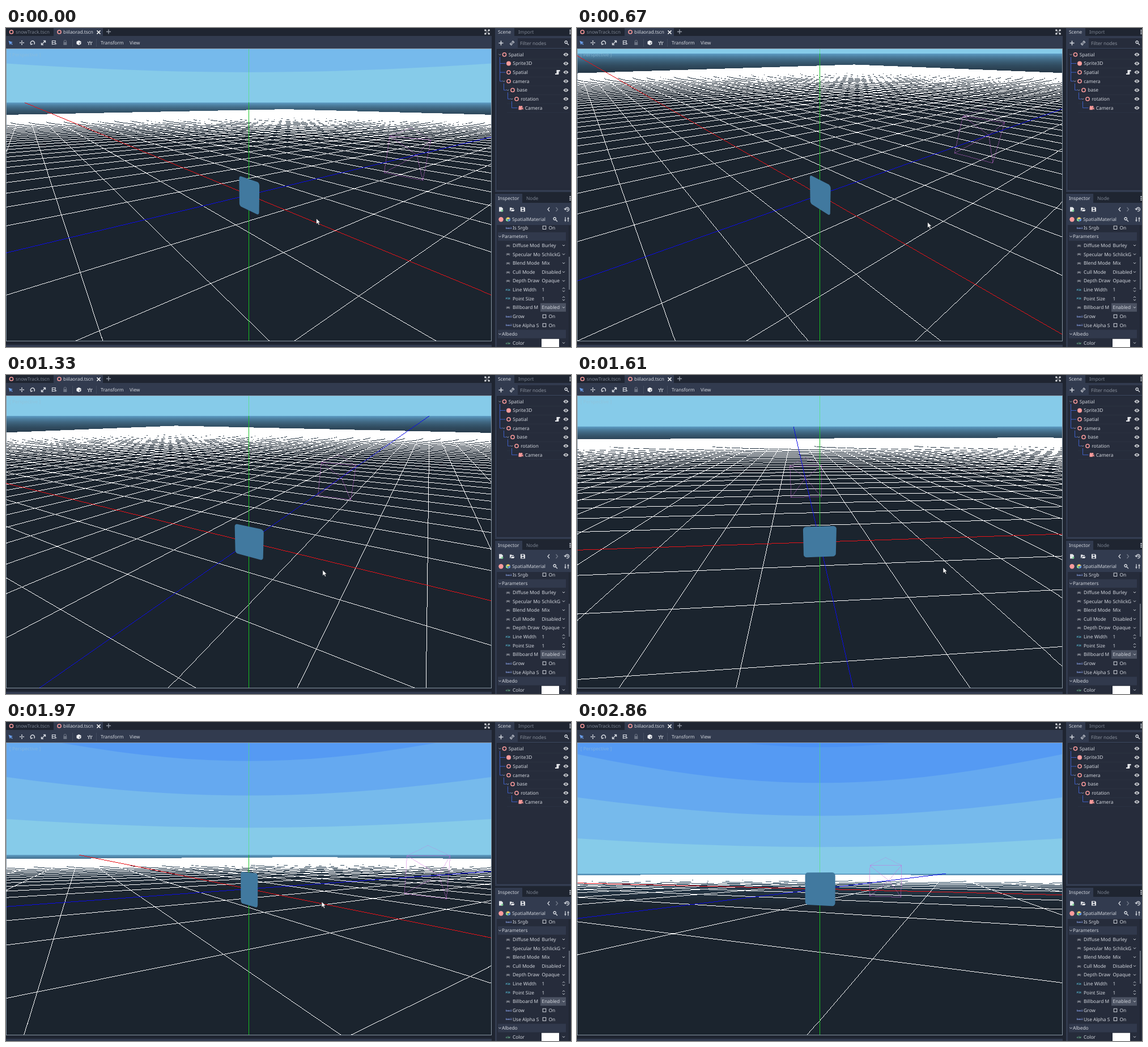
An HTML page with a canvas that plays this animation: 997 px wide and 562 px high, repeating every 3.55 s.

```html
<!DOCTYPE html>
<html lang="en">
<head>
<meta charset="utf-8">
<title>Billboard orbit</title>
<style>
html, body { margin: 0; width: 100%; height: 100%; overflow: hidden; background: #1f2531; }
canvas, svg { position: absolute; left: 0; top: 0; width: 997px; height: 562px; display: block; }
text { font: 8.4px "Noto Sans", "Open Sans", sans-serif; text-rendering: geometricPrecision; white-space: pre; }
.tag { font: bold 4.4px "Noto Sans Mono", monospace; }
</style>
</head>
<body>
<canvas id="view" width="997" height="562"></canvas>
<svg id="ui" viewBox="0 0 997 562"></svg>
<script>
const LOOP = 3550, RAD = Math.PI / 180;
const F = 493.7, CX = 428.5, CY = 294.2, DIST = 5.44;
const VIEW = { x: 1, y: 37, w: 855, h: 514 };

// first change, last change, number of changes
const BURSTS = [[80, 590, 8], [670, 1170, 8], [1250, 1750, 8], [1830, 2280, 7], [2360, 2860, 8]];

// time, pitch, yaw, pointer x, pointer y
const KEYS = [
  [0, 18.26, -37.27, 547.5, 335.5],
  [371, 27.68, -14.06, 495, 349],
  [670, 26.78, -38.15, 618.5, 342],
  [1027, 24.1, -15.92, 476, 344.5],
  [1607, 22.4, -94.96, 646, 339],
  [1980, 6.94, -31.04, 557, 316.5],
  [2560, 3.3, -64, 660, 312],
  [2789, 3.13, -65.8, 970, 550],
  [2860, 3.13, -65.8, 975, 570]
];

function snap(t) {
  let s = 0;
  for (const [a, b, n] of BURSTS) {
    if (t < a) break;
    const step = (b - a) / (n - 1);
    s = a + step * Math.min(n - 1, Math.floor((t - a + 11) / step));
  }
  return s;
}

function slope(i, c) {
  if (i === 0 || i >= KEYS.length - 3) return 0;
  const a = KEYS[i - 1], b = KEYS[i + 1];
  return (b[c] - a[c]) / (b[0] - a[0]);
}

function pose(t) {
  let i = 0;
  while (i < KEYS.length - 2 && t >= KEYS[i + 1][0]) i++;
  const a = KEYS[i], b = KEYS[i + 1], span = b[0] - a[0];
  const s = Math.min(1, (t - a[0]) / span), q = 1 - s;
  return [1, 2, 3, 4].map(c =>
    q * q * (1 + 2 * s) * a[c] + s * s * (3 - 2 * s) * b[c] +
    s * q * span * (q * slope(i, c) - s * slope(i + 1, c)));
}

// ---- 3D view ----
const g = document.getElementById('view').getContext('2d', { willReadFrequently: true });
const SKY = ['#4c92f4', '#559af3', '#65a9f0', '#76baec', '#86cbe9'];
const EDGES = [23.7, 17.6, 11.5, 5.4];
let cp, sp, ca, sa, image;

function aim(pitch, yaw) {
  cp = Math.cos(pitch * RAD); sp = Math.sin(pitch * RAD);
  ca = Math.cos(yaw * RAD); sa = Math.sin(yaw * RAD);
}
const toEye = ([x, y, z]) => {
  const fwd = x * ca - z * sa;
  return [x * sa + z * ca, y * cp + fwd * sp, DIST + fwd * cp - y * sp];
};
const toScreen = ([r, u, d]) => [CX + F * r / d, CY - F * u / d];
const project = p => toScreen(toEye(p));

// hard one-pixel line, cut to the near plane and to the viewport
function drawLine(p, q, color, alpha = 1) {
  const near = 0.1;
  let a = toEye(p), b = toEye(q);
  if (a[2] < near && b[2] < near) return;
  const cut = (i, o) => i.map((v, n) => v + (o[n] - v) * (near - i[2]) / (o[2] - i[2]));
  if (a[2] < near) a = cut(a, b);
  if (b[2] < near) b = cut(b, a);
  const [x0, y0] = toScreen(a), [x1, y1] = toScreen(b), dx = x1 - x0, dy = y1 - y0;
  let from = 0, to = 1;
  const limit = (v, d, lo, size) => {
    const m = (lo - v) / d, n = (lo + size - 0.01 - v) / d;
    from = Math.max(from, Math.min(m, n));
    to = Math.min(to, Math.max(m, n));
  };
  limit(x0, dx || 1e-9, VIEW.x, VIEW.w);
  limit(y0, dy || 1e-9, VIEW.y, VIEW.h);
  if (from >= to) return;
  const steps = Math.ceil(Math.max(Math.abs(dx), Math.abs(dy)) * (to - from));
  for (let i = 0; i <= steps; i++) {
    const t = from + (to - from) * i / steps;
    const at = (Math.floor(y0 + dy * t) * image.width + Math.floor(x0 + dx * t)) * 4;
    for (let c = 0; c < 3; c++) image.data[at + c] += (color[c] - image.data[at + c]) * alpha;
  }
}

function drawSky(pitch) {
  const bottom = VIEW.y + VIEW.h;
  g.fillStyle = SKY[0];
  g.fillRect(VIEW.x, VIEW.y, VIEW.w, VIEW.h);
  EDGES.forEach((e, i) => {
    const ce = Math.cos(e * RAD), se = Math.sin(e * RAD);
    g.fillStyle = SKY[i + 1];
    g.beginPath();
    g.moveTo(-400, bottom);
    for (let b = -60; b <= 60; b += 4) {
      const r = ce * Math.sin(b * RAD), f = ce * Math.cos(b * RAD);
      g.lineTo(...toScreen([r, se * cp + f * sp, f * cp - se * sp]));
    }
    g.lineTo(1400, bottom);
    g.fill();
  });
  const yAt = drop => CY - F * Math.tan((pitch - drop) * RAD);
  const top = yAt(0), low = yAt(7);
  const grad = g.createLinearGradient(0, top, 0, low);
  for (const d of [0, 0.5, 1, 1.5, 2, 3, 5, 7]) {
    const k = d === 7 ? 1 : 1 - Math.pow(1 - d / 90, 50);
    const mix = (a, b) => Math.round(a + (b - a) * k);
    grad.addColorStop(Math.min(1, (yAt(d) - top) / (low - top)),
      `rgb(${mix(93, 27)},${mix(156, 36)},${mix(196, 46)})`);
  }
  g.fillStyle = grad;
  g.fillRect(VIEW.x, top, VIEW.w, bottom - top);
  return top;
}

function drawGrid() {
  const N = 50, white = [255, 255, 255];
  for (let i = -N; i <= N; i++) {
    if (i === 0) continue;
    drawLine([i, 0, -N], [i, 0, N], white);
    drawLine([-N, 0, i], [N, 0, i], white);
  }
}

function drawGizmo() {
  const w = 0.63, z = 6.45, eye = [0, 0, 7.25], tip = [0, w * 1.5, z];
  const pink = [205, 105, 220];
  const c = [[-w, -w, z], [w, -w, z], [w, w, z], [-w, w, z]];
  c.forEach((p, i) => {
    drawLine(p, c[(i + 1) % 4], pink, 0.5);
    drawLine(p, eye, pink, 0.5);
  });
  drawLine(c[2], tip, pink, 0.3);
  drawLine(c[3], tip, pink, 0.3);
}

function drawSprite() {
  const h = 0.32, r = 0.06;
  g.fillStyle = '#41799f';
  g.beginPath();
  for (let i = 0; i < 4; i++) {
    const sx = i === 0 || i === 3 ? 1 : -1, sy = i < 2 ? 1 : -1;
    for (let k = 0; k <= 4; k++) {
      const n = (i * 90 + k * 22.5) * RAD;
      g.lineTo(...project([sx * (h - r) + r * Math.cos(n), sy * (h - r) + r * Math.sin(n), 0]));
    }
  }
  g.fill();
}

function drawView(pitch, yaw) {
  const far = 4000;
  aim(pitch, yaw);
  g.clearRect(0, 0, 997, 562);
  g.save();
  g.beginPath();
  g.rect(VIEW.x, VIEW.y, VIEW.w, VIEW.h);
  g.clip();
  const horizon = Math.max(VIEW.y, Math.round(drawSky(pitch)));
  image = g.getImageData(0, 0, 997, 562);
  drawGrid();
  drawGizmo();
  drawLine([-far, 0, 0], [far, 0, 0], [232, 18, 24]);
  drawLine([0, 0, -far], [0, 0, far], [12, 12, 230]);
  g.putImageData(image, 0, 0);
  g.fillStyle = 'rgba(70,235,90,.6)';
  g.fillRect(428, VIEW.y, 1, horizon - VIEW.y);
  g.fillStyle = 'rgb(22,195,34)';
  g.fillRect(428, horizon, 1, 600);
  drawSprite();
  g.restore();
}

// ---- editor panels ----
const FG = '#d3d7de', DIM = '#7b8391', PINK = '#fc9c9c';
const PANEL = '#323b4f', INSET = '#262c3b', DARK = '#1f2531';
const out = [];
const text = (x, y, s, c = FG, cls = '') =>
  out.push(`<text x="${x}" y="${y + 3}" fill="${c}" class="${cls}">${s}</text>`);
const rect = (x, y, w, h, c, extra = '') =>
  out.push(`<rect x="${x}" y="${y}" width="${w}" height="${h}" fill="${c}" ${extra}/>`);
const line = (x, y, d, c = FG, w = 1.2) =>
  out.push(`<path transform="translate(${x} ${y})" d="${d}" fill="none" stroke="${c}" stroke-width="${w}"/>`);
const shape = (x, y, d, c = FG) =>
  out.push(`<path transform="translate(${x} ${y})" d="${d}" fill="${c}" fill-rule="evenodd"/>`);
const ring = (x, y) =>
  out.push(`<circle cx="${x}" cy="${y}" r="3.1" fill="none" stroke="${PINK}" stroke-width="1.5"/>`);
const dot = (x, y, r, c) => out.push(`<circle cx="${x}" cy="${y}" r="${r}" fill="${c}"/>`);
const chevron = (x, y, c = FG) => line(x, y, 'M-2-1L0 1L2-1', c, 1);
const search = (x, y) => line(x, y, 'M-3-1A2.2 2.2 0 1 0 1.4-1A2.2 2.2 0 1 0-3-1M.8 .8L4 4', FG, 1.4);
const eye = (x, y) => {
  shape(x, y, 'M-4.5 0Q0-6 4.5 0Q0 6-4.5 0Z', '#e4e6ea');
  dot(x, y, 1.9, DARK);
  dot(x, y, 0.9, '#e4e6ea');
};
const more = (x, y) => [-3, 0, 3].forEach(k => rect(x - 1, y + k - 1, 2, 2, FG));

function mainBar() {
  rect(0, 0, 997, 36, DARK);
  rect(0, 14, 857, 22, PANEL);
  rect(84, 0, 87, 14, PANEL);
  ring(9.5, 7); text(17, 7, 'snowTrack.tscn', DIM);
  ring(94, 7); text(101, 7, 'biilaorad.tscn');
  line(163.5, 7.5, 'M-3-3L3 3M3-3L-3 3', '#fff', 1.6);
  line(181, 6.5, 'M-4 0H4M0-4V4', '#9299a5', 1.4);
  line(849, 7, 'M-4-1.5V-4H-1.5M1.5-4H4V-1.5M4 1.5V4H1.5M-1.5 4H-4V1.5M-4-4L-1-1M4-4L1-1M4 4L1 1M-4 4L-1 1', '#e4e6ea', 1.2);
  shape(8, 26, 'M-3.5-3.5L4-1L1.3 .2L3.8 2.8L2.7 3.8L.2 1.3L-1 4Z', '#699ce8');
  line(28, 26, 'M-4 0H-1.5M1.5 0H4M0-4V-1.5M0 1.5V4', FG, 1.6);
  dot(28, 26, 1, FG);
  line(47, 26, 'M-3 2.5A3.5 3.5 0 1 1 2.5 2.8M-4 0L-3 3L0 2', FG, 1.4);
  line(66, 26, 'M-3.5 0V3.5H0M0-3.5H3.5V0M-3 3L3-3', FG, 1.4);
  line(85, 26, 'M-4-3.5H3M-4-.5H1M-4 2.5H1M-3.5-4V3.5M2-3V1', FG, 1.2);
  shape(87.5, 28, 'M-1.5-2L2.5 0L0 .6L-.5 2.5Z');
  rect(101.3, 25, 6, 5, '#6a7282'); line(104.3, 25, 'M-2 0V-1.5A2 2 0 0 1 2-1.5V0', '#6a7282', 1.2);
  shape(128.5, 26, 'M0-4.3L4-2.2V2.2L0 4.3L-4 2.2V-2.2ZM.6 .5V3L3-1Z', '#eceef1');
  line(148, 27, 'M-2 3V0A2 2 0 0 1 2 0V3M-3.5-3V-1M0-4V-2.4M3.5-3V-1', FG, 1.2);
  rect(117, 19, 1, 14, '#434c5f'); rect(159, 19, 1, 14, '#434c5f');
  text(167, 26, 'Transform'); text(218, 26, 'View');
}

function frame() {
  rect(0.5, 36.5, 856, 515, 'none', 'stroke="#8795a2" stroke-width="1"');
  rect(857, 36, 140, 526, DARK);
  rect(0, 552, 863, 10, DARK);
  rect(0, 558, 857, 4, PANEL);
  text(6, 46.5, '[ Perspective ]', 'rgba(150,190,212,.6)');
}

function sceneDock() {
  rect(863, 14, 134, 275, PANEL);
  rect(863, 0, 34, 14, PANEL);
  text(868, 7, 'Scene'); text(904, 7, 'Import', DIM); more(995.5, 7);
  line(873.5, 26.5, 'M-4 0H4M0-4V4', FG, 1.6);
  line(893, 26.5, 'M-1 1L1-1M-.5-2L1.5-3.5L3.5-1.5L2 .5M.5 2L-1.5 3.5L-3.5 1.5L-2-.5', FG, 1.2);
  rect(903, 18, 94, 17, INSET); text(907, 26.5, 'Filter nodes', '#8b929e'); search(989, 26);
  rect(866.5, 37.5, 131, 247, INSET, `stroke="${DARK}"`);
  const rowY = i => 46.8 + 15.65 * i;
  for (let i = 1; i < 8; i++) rect(884, rowY(i) - 8, 110, 1, '#2c3342');
  const BLUE = '#3f5fc4';
  line(871.5, 0, `M0 51V${rowY(3)}H5M0 ${rowY(1)}H10M0 ${rowY(2)}H10`, BLUE, 1);
  [[878.5, 3], [885.5, 4], [892.5, 5]].forEach(([x, i]) =>
    line(x, 0, `M0 ${rowY(i) + 4}V${rowY(i + 1)}H${i === 5 ? 10 : 5}`, BLUE, 1));
  [[871.5, 0], [878.5, 3], [885.5, 4], [892.5, 5]].forEach(([x, i]) => chevron(x, rowY(i), '#9aa1ad'));
  const nodes = [['Spatial', 879.5], ['Sprite3D', 887], ['Spatial', 887], ['camera', 887],
    ['base', 894], ['rotation', 901], ['Camera', 908.5]];
  nodes.forEach(([name, x], i) => {
    const y = rowY(i);
    if (i === 1) dot(x, y, 4, PINK);
    else if (i === 6) {
      rect(x - 4, y - 1, 5.5, 4.5, PINK); dot(x - 2, y - 2, 1.8, PINK); dot(x + 1.2, y - 2, 1.8, PINK);
      shape(x + 1, y + 1, 'M0 0L3-2V2.5Z', PINK);
    } else ring(x, y);
    text(x + 7.3, y, name);
    eye(988, y);
  });
  shape(973, rowY(2), 'M-1.5-4H4.5V-1.5H2.5V2.5Q2.5 4 1 4H-4V1.8H-1.5Z', '#e4e6ea');
}

const TYPES = { bool: ['bool', '#8da6f0'], enum: ['(E)', '#e4e6ea'], flt: ['Flt', '#61daf4'], clr: ['clr', '#7fe0a0'] };

function inspector() {
  rect(863, 308, 134, 254, PANEL);
  rect(863, 292, 48, 16, PANEL);
  text(868, 300, 'Inspector'); text(918, 300, 'Node', DIM); more(995.5, 300);
  shape(873.5, 319.5, 'M-3.5-4H1L3.5-1.5V1H1.5V4H-3.5Z', '#e4e6ea');
  line(875.5, 322, 'M-2 0H2M0-2V2', '#84e19b', 1.4);
  shape(893, 319.5, 'M-4-3H-1L0-2H3V-.5H-1.5L-3 3H-4ZM-1 .5H4.5L3 3.5H-2Z', '#e4e6ea');
  shape(912, 319.5, 'M-4-4H2.5L4-2.5V4H-4ZM-2-3V-.8H1.5V-3ZM-2 1V3H2V1Z', '#e4e6ea');
  line(957.5, 319.5, 'M1.5-3.5L-1.5 0L1.5 3.5', FG, 1.3);
  line(972, 319.5, 'M-1.5-3.5L1.5 0L-1.5 3.5', '#717989', 1.3);
  line(990, 319.5, 'M-3 0A3.3 3.3 0 1 1-1 3M-5-1.5L-3 .8L-1-1.2M.5-2V.5H2.5', FG, 1.2);
  dot(873.5, 337.2, 4.2, PINK);
  shape(886, 337.2, 'M0-4L4-2L0 0L-4-2Z', '#ffd96b');
  shape(886, 337.2, 'M-4-1.5L-.4 .4V4L-4 2Z', '#84e19b');
  shape(886, 337.2, 'M4-1.5L.4 .4V4L4 2Z', '#699ce8');
  text(893, 337.2, 'SpatialMaterial'); search(969, 337);
  line(989.5, 337.2, 'M-2.5-4V4M2.5-4V4M-4 1.5H-1M1-1.5H4', FG, 1.3);

  out.push('<clipPath id="rows"><rect x="863" y="347" width="134" height="215"/></clipPath><g clip-path="url(#rows)">');
  rect(866, 347, 131, 215, INSET);
  const rows = [
    ['bool', 'Is Srgb'], ['head', 'Parameters'], ['enum', 'Diffuse Mod', 'Burley'],
    ['enum', 'Specular Mo', 'SchlickG'], ['enum', 'Blend Mode', 'Mix'], ['enum', 'Cull Mode', 'Disabled'],
    ['enum', 'Depth Draw', 'Opaque'], ['flt', 'Line Width', '1'], ['flt', 'Point Size', '1'],
    ['enum', 'Billboard M', 'Enabled'], ['bool', 'Grow'], ['bool', 'Use Alpha S'],
    ['head', 'Albedo'], ['clr', 'Color']
  ];
  rows.forEach(([type, label, value], i) => {
    const y = 351.7 + 15.62 * i;
    if (type === 'head') {
      rect(868, y - 7.5, 120, 15, '#31394c');
      chevron(871.5, y);
      text(875, y, label);
      return;
    }
    const [tag, color] = TYPES[type];
    text(882, y - 1.2, tag, color, 'tag');
    text(894, y, label);
    if (type === 'bool') {
      rect(947.2, y - 2.8, 5.6, 5.6, 'none', `stroke="${FG}" stroke-width="1"`);
      text(957.5, y, 'On');
    } else if (type === 'clr') {
      rect(945, y - 7, 31, 15, '#fff');
      chevron(984, y);
    } else {
      if (value === 'Enabled') rect(943, y - 7.5, 45, 15, '#4b5262');
      text(945.5, y, value);
      if (type === 'flt') line(984, y, 'M-2-1.5L0-3.5L2-1.5M-2 1.5L0 3.5L2 1.5', FG, 1);
      else chevron(984, y);
    }
  });
  out.push('</g>');
  rect(993, 348, 2, 214, DARK);
  rect(993, 403, 2, 58, '#666d7a');
}

mainBar();
frame();
sceneDock();
inspector();
out.push('<path id="pointer" d="M0 0V10.2L2.4 8L4.1 11.7L5.9 10.9L4.2 7.3H7.4Z" fill="#fff" stroke="#10151c" stroke-width=".7"/>');
document.getElementById('ui').innerHTML = out.join('');
const pointer = document.getElementById('pointer');

let shown = -1;
function render(t) {
  const s = snap(t);
  if (s === shown) return;
  shown = s;
  const [pitch, yaw, x, y] = pose(s);
  drawView(pitch, yaw);
  pointer.setAttribute('transform', `translate(${x.toFixed(1)} ${y.toFixed(1)})`);
}

const start = performance.now();
function tick() {
  render((performance.now() - start) % LOOP);
  requestAnimationFrame(tick);
}
tick();
</script>
</body>
</html>
```
